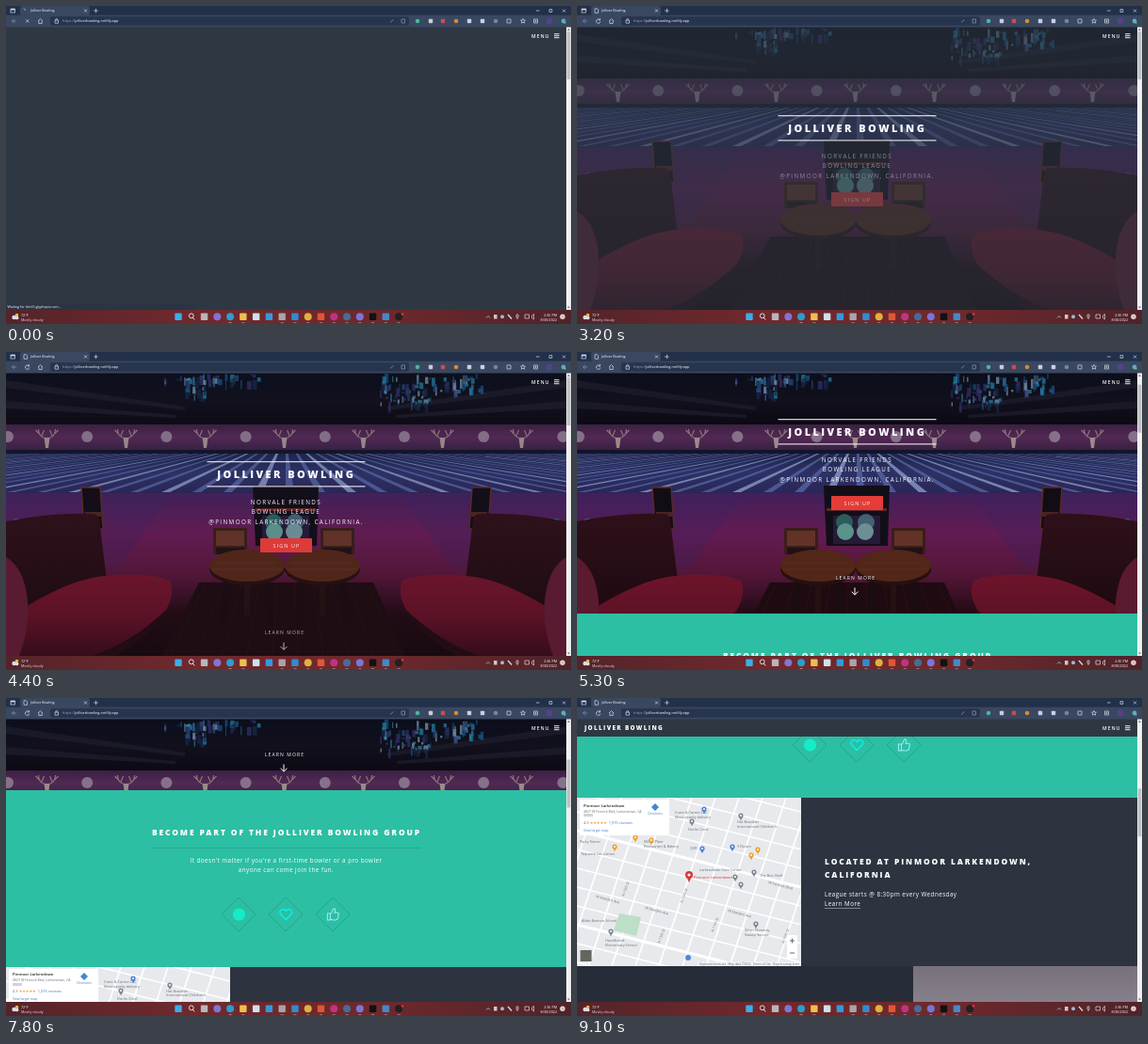
These frames come from a looping animation (600 px wide and 338 px high, 9.3 s). An HTML page:

```html
<!DOCTYPE html>
<html lang="en">
<head>
<meta charset="utf-8">
<title>Jolliver Bowling</title>
<style>
html, body { margin: 0; width: 100%; height: 100%; overflow: hidden; background: #2e3842; }
svg { display: block; width: 600px; height: 338px; }
text { font-family: "Open Sans", "Noto Sans", sans-serif; fill: #fff; white-space: pre; }
.caps { letter-spacing: .225em; }
.body { letter-spacing: .075em; }
.mid { text-anchor: middle; }
.semi { font-weight: 600; }
.heavy { font-weight: 800; }
.map text { fill: #6a7078; }
.line { fill: none; stroke: #d5dae4; stroke-width: .7; }
</style>
</head>
<body>
<svg id="stage" viewBox="0 0 600 338"></svg>
<script>
const LOOP = 9300, REVEAL = 600, BANNER_BOTTOM = 323;
const SLATE = '#2e3842';

// Markup helpers
const rect = (x, y, w, h, fill, more = '') =>
  `<rect x="${x}" y="${y}" width="${w}" height="${h}" fill="${fill}" ${more}/>`;
const disc = (x, y, rx, fill, ry = rx) => `<ellipse cx="${x}" cy="${y}" rx="${rx}" ry="${ry}" fill="${fill}"/>`;
const path = (d, fill, more = '') => `<path d="${d}" fill="${fill}" ${more}/>`;
const stroke = (d, color = '#d5dae4', width = .7) => path(d, 'none', `stroke="${color}" stroke-width="${width}"`);
const text = (x, y, size, str, cls = '', more = '') =>
  `<text x="${x}" y="${y}" font-size="${size}" class="${cls}" ${more}>${str}</text>`;
const group = (id, body, more = '') => `<g id="${id}" ${more}>${body}</g>`;
const repeat = (n, fn) => Array.from({ length: n }, (_, i) => fn(i)).join('');
const gradient = (id, stops, dir = 'x2="0" y2="1"') => `<linearGradient id="${id}" ${dir}>` +
  stops.map((c, i) => `<stop offset="${i / (stops.length - 1)}" stop-color="${c}"/>`).join('') + '</linearGradient>';

let seed = 7;
const random = () => (seed = seed * 16807 % 2147483647) / 2147483647;

const defs = '<defs><clipPath id="view">' + rect(0, 22, 595, 301, '#000') + '</clipPath>' +
  '<clipPath id="mapBox">' + rect(0, 0, 238, 179, '#000') + '</clipPath>' +
  gradient('ceiling', ['#0b0e1b', '#11101c', '#0c0913']) +
  gradient('wall', ['#3b2043', '#522953', '#381f42']) +
  gradient('lanes', ['#1d2144', '#2c3266', '#2b2455']) +
  gradient('floor', ['#42205a', '#631b52', '#531637', '#200a13', '#16080e']) +
  gradient('seat', ['#6e142b', '#5d1125', '#350c19']) +
  gradient('sofa', ['#2e1019', '#260d15', '#1b0910']) +
  gradient('bar', ['#54242a', '#70292d', '#6d292c', '#50232a'], '') +
  gradient('room', ['#77717c', '#9b949f', '#a58e98']) + '</defs>';

function photoSide() {
  const colors = ['#8a2633', '#226b74', '#323e83', '#4f6b33', '#843d67', '#283e4a'];
  return path('M0 152H175L120 230H0Z', '#3b2460', 'opacity=".3"') +
    rect(0, 188, 72, 9, '#15101c') +
    repeat(9, i => disc(3 + i * 8, 187 - i % 2 * 5, 5, colors[i % 6])) +
    path('M80 144H100L103 188H83Z', '#120d15', 'stroke="#5a2a24" stroke-width="1.5"') + rect(84, 170, 17, 5, '#4a2421') +
    path('M0 180Q50 170 92 172Q98 172 99 178L107 243Q80 275 0 285Z', 'url(#sofa)') +
    path('M14 275Q70 240 106 238Q152 234 174 243Q180 256 170 274Q150 304 116 323H0Q4 290 14 275Z', 'url(#seat)') +
    path('M170 274Q150 304 116 323H92Q135 308 170 274Z', '#210a13') +
    path('M0 218Q20 230 23 265Q25 295 14 323H0Z', '#5a1a30');
}

function photoTable(x) {
  return path(`M${x - 25} 238L${x - 29} 290H${x - 24}L${x - 18} 240H${x + 18}L${x + 24} 290H${x + 29}L${x + 25} 238Z`, '#1a0c11') +
    rect(x - 3, 238, 6, 42, '#241113') + disc(x, 231, 40, '#26100f', 17) + disc(x, 227, 40, '#522619', 17) +
    stroke(`M${x - 34} 224H${x + 30}M${x - 37} 231H${x + 36}`, '#67351f', .6);
}

function photo() {
  const specks = (x, y, w, h, n) => repeat(n, () =>
    rect(x + random() * w, y + random() * h, 1 + random() * 4, 2 + random() * 9,
      ['#1d4f80', '#2483a6', '#33336e', '#7d9cb0', '#162a4c'][random() * 5 | 0], 'opacity=".7"'));
  const antlers = x => stroke(`M${x} 92Q${x - 9} 91 ${x - 9} 82M${x - 6} 90L${x - 3} 83M${x - 8} 87L${x - 12} 83` +
    `M${x} 92Q${x + 9} 91 ${x + 9} 82M${x + 6} 90L${x + 3} 83M${x + 8} 87L${x + 12} 83`, '#8d7a80', 1.1) +
    path(`M${x - 3} 91H${x + 3}L${x + 1.5} 102H${x - 1.5}Z`, '#9c898b');
  const chair = x => rect(x, 187, 36, 28, '#3b1d19', 'rx="1"') + rect(x + 3, 190, 30, 16, '#633226') +
    rect(x + 3, 208, 30, 7, '#211113');
  const side = photoSide();
  return rect(0, 22, 595, 57, 'url(#ceiling)') +
    path('M0 30L190 58V62L0 38ZM595 30L405 58V62L595 38ZM0 52L180 67V70L0 60ZM595 52L415 67V70L595 60Z', '#191927') +
    specks(168, 22, 102, 9, 40) + specks(190, 28, 20, 18, 16) + specks(396, 23, 112, 18, 60) + specks(396, 40, 55, 16, 30) +
    rect(0, 77, 595, 28, 'url(#wall)') +
    repeat(8, i => disc(2 + i * 84.2, 90, 6, '#87718a')) + repeat(7, i => antlers(43.5 + i * 84)) +
    rect(0, 104, 595, 48, 'url(#lanes)') +
    repeat(81, i => {
      const k = i - 40, top = 297 + k * 10, bottom = 297 + k * 33;
      return path(`M${top} 107H${top + 2.5}L${bottom + 9} 149H${bottom}Z`, i % 3 ? '#5967a4' : '#91a0cc', 'opacity=".75"');
    }) +
    rect(0, 104, 595, 4, '#12152a') +
    rect(0, 150, 595, 173, 'url(#floor)') +
    path('M205 245H390L425 323H165Z', '#1d0b11') +
    repeat(10, i => stroke(`M${212 + i * 19} 246L${175 + i * 27} 323`, '#2c1117', .8)) +
    side + `<g transform="translate(595 0) scale(-1 1)">${side}</g>` +
    path('M262 142H332L330 206H265Z', '#120e18') + rect(265, 166, 64, 3, '#5d2728') + rect(272, 174, 50, 30, '#251b38') +
    [[284, 181, '#2d5c5b'], [307, 181, '#455f73'], [285, 191, '#5a938c'], [306, 191, '#6c8f96']].map(([x, y, c]) => disc(x, y, 9, c)).join('') +
    chair(220) + chair(334) + photoTable(256) + photoTable(336);
}

const signUp = () =>
  ['NORVALE FRIENDS', 'BOWLING LEAGUE', '@PINMOOR LARKENDOWN, CALIFORNIA.'].map((s, i) =>
    text(297.5, 161.8 + i * 10.4, 6.25, s, 'caps mid')).join('') +
  rect(270, 198, 55, 15, '#e43c37', 'rx=".8"') + text(298, 207.5, 5.3, 'SIGN UP', 'caps mid');

const headline = () => group('title',
  text(297.7, 134, 10.94, 'JOLLIVER BOWLING', 'caps heavy mid') +
  rect(213.5, 116.2, 168, 1, '#fff', 'id="lineTop"') + rect(213.5, 142.4, 168, 1, '#fff', 'id="lineBottom"'));

const more = () => group('more', text(296, 287, 5, 'LEARN MORE', 'caps mid') +
  stroke('M295 295.5V303M291.5 299.7L295 303.2L298.5 299.7', '#fff', 1));

function greenSection() {
  const diamond = x => path(`M${x} 114L${x + 18} 132L${x} 150L${x - 18} 132Z`, 'none', 'stroke="#239f88" stroke-width=".8"');
  return rect(0, 0, 595, 188.5, '#2cbfa3') +
    text(298, 48, 8.44, 'BECOME PART OF THE JOLLIVER BOWLING GROUP', 'caps heavy mid') +
    rect(155, 61, 285, .8, '#25a58d') +
    text(297.5, 77, 6.25, "It doesn't matter if you're a first-time bowler or a pro bowler", 'body mid') +
    text(297.5, 87.4, 6.25, 'anyone can come join the fun.', 'body mid') +
    [247, 297, 347].map(diamond).join('') + disc(247.5, 132, 6.6, '#14edc6') +
    stroke('M297.3 137.5L291.8 132C288.8 128 294.2 124.5 297.3 128.5C300.4 124.5 305.8 128 302.8 132Z', '#08f0ee', 1.4) +
    stroke('M341.4 131H344.4V138H341.4ZM344.5 131.5C347.5 129 346.5 126 348.3 125.8C350.5 126 349.8 128.5 349 130.3H352.4' +
      'C354.2 131 353 132.5 352.8 133C353.5 135 352 138 350 138H347L344.5 137', '#9aeaf7', 1.1);
}

function map() {
  const road = (x1, y1, x2, y2, w = 2.2) => stroke(`M${x1} ${y1}L${x2} ${y2}`, '#fff', w);
  const pin = (x, y, color, r = 2.6) => path(`M${x - r * .8} ${y + 1}L${x} ${y + r * 2}L${x + r * .8} ${y + 1}Z`, color) +
    disc(x, y, r, color) + disc(x, y, r * .4, '#fff');
  const places = [[104, 17, 'Crate &amp; Carrier LLC'], [104, 22, 'Most nearby delivery'], [118, 35, 'Dorlin Crest'],
    [170, 27, 'Hat Brandler'], [170, 31.5, "International Children's"], [170, 53, '9 Dozen'], [120, 55, 'QVR'],
    [194, 84, 'The Box Shelf'], [130, 78, 'Larkendown Care Center'], [71, 48, "Milo's Plate"],
    [71, 52.5, 'Restaurant &amp; Bakery'], [3, 48, 'Party Stores'], [4, 61, 'Taqueria Los Lomos'],
    [5, 132, 'Alder Avenue School'], [30, 153, 'Hazelbrook'], [30, 157.5, 'Elementary School'],
    [178, 142, 'Wren Chimney'], [178, 146.5, 'Sweep Service']];
  const streets = [[203, 91, 15, 'W Fennick Blvd'], [20, 106, 15, 'W Marden Ave'], [72, 118, 15, 'W Marden Ave'],
    [160, 121, 15, 'W Marden Ave'], [112, 112, -70, 'N 12th St'], [145, 143, -70, 'N 11th St'],
    [88, 155, -70, 'N 13th St'], [50, 105, -70, 'N 15th St'], [220, 155, -70, 'N 10th St']];
  return rect(0, 0, 238, 179, '#e7e9ed') +
    repeat(15, i => road(0, -65 + i * 20, 238, -5 + i * 20, i % 5 ? 1.6 : 3)) +
    repeat(13, i => road(-28 + i * 25, 0, -88 + i * 25, 179, 1.7)) +
    path('M45 123L68 127L63 147L39 141Z', '#bddfc5') +
    streets.map(([x, y, a, s]) => text(x, y, 3.8, s, '', `transform="rotate(${a} ${x} ${y})"`)).join('') +
    places.map(([x, y, s]) => text(x, y, 3.9, s)).join('') +
    [[40, 52], [62, 42], [79, 45], [185, 61], [192, 55]].map(([x, y]) => pin(x, y, '#efa02c')).join('') +
    [[133, 54], [135, 12], [165, 52]].map(([x, y]) => pin(x, y, '#4b80d9')).join('') +
    [[122, 25], [174, 92], [168, 84], [174, 19], [36, 142], [190, 134], [188, 79]].map(([x, y]) => pin(x, y, '#7b8794')).join('') +
    pin(119, 82, '#d63932', 4) + text(124, 85.5, 4.1, 'Pinmoor Larkendown', '', 'style="fill:#cb3a32"') +
    rect(3, 2, 95, 38, '#fff', 'rx="1"') +
    text(7, 9.5, 4.2, 'Pinmoor Larkendown', 'semi', 'style="fill:#222"') +
    text(7, 15.5, 3.5, '4827 W Fennick Blvd, Larkendown, CA') + text(7, 20, 3.5, '00000') +
    text(7, 27.5, 4, '4.3 <tspan fill="#ef9d2b">★★★★★</tspan>  <tspan fill="#4678c0">1,076 reviews</tspan>') +
    text(7, 35.5, 3.5, 'View larger map', '', 'style="fill:#4678c0"') +
    path('M83 6L87 10L83 14L79 10Z', '#4285d4') + text(83, 18, 3.3, 'Directions', 'mid', 'style="fill:#4678c0"') +
    rect(3.5, 162, 12, 12, '#62665f') + disc(118, 170, 3, '#5487db') +
    rect(223, 146, 11, 25, '#fff', 'rx="1"') + stroke('M226 152H231M228.5 149.5V154.5M226 165H231', '#666', 1) +
    rect(128, 174.5, 110, 4.5, '#f2f3f5') +
    text(236, 178, 3.1, 'Keyboard shortcuts   Map data ©2022   Terms of Use   Report a map error', '', 'text-anchor="end"');
}

const spotlights = () => rect(0, 188, 595, 179, '#2d3440') + rect(0, 367, 595, 179, '#272d38') +
  rect(357, 367, 238, 179, 'url(#room)') +
  group('map', map(), 'class="map" transform="translate(0 188)" clip-path="url(#mapBox)"') +
  text(263, 258.7, 8.44, 'LOCATED AT PINMOOR LARKENDOWN,', 'caps heavy') + text(263, 273.4, 8.44, 'CALIFORNIA', 'caps heavy') +
  text(263, 293.2, 6.25, 'League starts @ 8:30pm every Wednesday', 'body') +
  text(263, 303.3, 6.25, 'Learn More', 'body') + rect(263, 305, 38, .6, '#b8bcc2');

const menu = () => text(558, 33.8, 5, 'MENU', 'caps semi') + [29.3, 31.3, 33.3].map(y => rect(582, y, 5.5, .9, '#fff')).join('');

function browser() {
  const extensions = [[437, '#49b79b'], [451, '#c6ccd2'], [464, '#c84b53'], [478, '#d38b33'], [492, '#c7cfd8'],
    [506, '#c9cbea'], [520, '#77849a']];
  return rect(0, 0, 600, 10, '#22304a') + rect(15, 0, 74, 10, '#394760', 'rx="2"') + rect(0, 9.7, 600, 12.8, '#394760') +
    rect(47, 11.3, 381, 9.5, '#27344d', 'rx="2"') +
    rect(5, 3, 4.5, 4, 'none', 'class="line"') + rect(5, 3, 4.5, 1.4, '#d5dae4') +
    text(26, 6.4, 3.65, 'Jolliver Bowling') + stroke('M83 3.5L86 6.5M86 3.5L83 6.5M95.5 2.7V7.3M93.2 5H97.8') +
    stroke('M563 5H566.5M577 3.6H579.8V6.4H577ZM591 3.6L594 6.6M594 3.6L591 6.6') +
    stroke('M11 16H6.5L8.7 13.7M6.5 16L8.7 18.3', '#8e9ab0') +
    stroke('M34 16L36.5 13.6L39 16M34.8 15.4V18.5H38.2V15.4') +
    group('stop', stroke('M21 14.3L24.4 17.7M24.4 14.3L21 17.7')) +
    group('reload', stroke('M24.2 14.6A2.2 2.2 0 1 0 24.8 16.5M24.5 13V15H22.5')) +
    group('spinner', path('M18.5 2.8A2.2 2.2 0 0 1 20.7 5', 'none', 'stroke="#7cb4e8" stroke-width=".8"')) +
    group('favicon', stroke('M19 2.7H21.3L22.6 4V7.3H19Z')) +
    stroke('M52 15.2H55.5V18.2H52ZM52.7 15V14Q53.7 12.7 54.7 14V15') +
    text(60, 17.4, 3.9, '<tspan fill="#9ba6b9">https://</tspan>jolliverbowling.netlify.app') +
    stroke('M408 17.5L411.5 14.5M420 14H423.5V18H420Z', '#8e9ab0') +
    extensions.map(([x, c], i) => i % 3 ? rect(x - 2.2, 13.8, 4.4, 4.4, c, 'rx=".8"') : disc(x, 16, 2.3, c)).join('') +
    stroke('M532 14H536V18H532ZM549 13.5L549.8 15.2H551.5L550.2 16.4L550.7 18.2L549 17.2L547.3 18.2L547.8 16.4L546.5 15.2H548.2Z' +
      'M560.5 14H564.5V18H560.5ZM562.5 15V17M561.5 16H563.5') +
    disc(577, 16, 3.5, '#53428a') + disc(592, 16, 2.4, '#58adc0') + disc(593.4, 17.6, 1.2, '#62bd73');
}

function taskbar() {
  const apps = ['#39aeea', '', '#b7b6bc', '#8274d1', '#299fca', '#efbf4d', '#cbe2ec', '#2e9bde', '#a9a4a8', '#318bd0',
    '#dfb13d', '#e15635', '#c03285', '#456d95', '#7b75d7', '#101312', '#4589c4', '#222025'];
  const round = [3, 4, 10, 12, 13, 14, 17];
  const x = i => 183 + i * 13.77;
  return rect(0, 323, 600, 15, 'url(#bar)') +
    apps.map((c, i) => !c ? stroke('M198.3 331.2L200.2 333.4', '#eee', 1) + stroke('M194.4 329.3A2.4 2.4 0 1 0 199.2 329.3A2.4 2.4 0 1 0 194.4 329.3', '#eee', .9)
      : round.includes(i) ? disc(x(i), 330.2, 4, c) : rect(x(i) - 3.7, 326.6, 7.4, 7.4, c, 'rx=".8"')).join('') +
    disc(421, 327.5, 1.3, '#e33') + [4, 5, 8, 9, 10, 11, 12, 13, 14, 15, 16, 17].map(i => rect(x(i) - 1.5, 336, 3, .8, i === 4 ? '#e38a80' : '#a98486')).join('') +
    disc(11.5, 328.5, 1.8, '#efb943') + disc(8.5, 331, 2.2, '#dce0e5') + disc(11.5, 331.4, 1.9, '#dce0e5') +
    text(16, 329.5, 3.7, '72°F') + text(16, 335, 3.7, 'Mostly cloudy', '', 'opacity=".85"') +
    stroke('M510 331.5L512 329.5L514 331.5M551 328H555.5V332H551ZM542 328H544V331H542ZM543 331V333M558.5 329V331.5L560.5 333V327.5Z') +
    rect(518, 328, 3.5, 4.5, '#d0c7c7') + disc(527, 330.3, 2, '#9fb8cf') + stroke('M533 328L537 332.5', '#ddd', 1.3) +
    text(585, 329.5, 3.7, '2:36 PM', '', 'text-anchor="end"') + text(585, 335, 3.7, '8/30/2022', '', 'text-anchor="end"') +
    disc(591, 330.2, 2.7, '#e7d7d5') + text(591, 331.5, 3.5, '1', 'mid', 'style="fill:#5a262b"');
}

document.getElementById('stage').innerHTML = defs + rect(0, 0, 600, 338, SLATE) +
  group('viewport',
    photo() + group('lead', signUp()) + rect(0, 22, 595, 301, SLATE, 'id="veil"') +
    group('banner', headline() + more()) + group('page', greenSection() + spotlights()) +
    group('header', rect(0, 22, 595, 19, SLATE) + text(8, 33.8, 6.25, 'JOLLIVER BOWLING', 'caps heavy')) + menu() +
    group('status', rect(0, 316.5, 201, 6.5, '#2a3443') + text(1.5, 321.2, 3.6, 'Waiting for html5.glyphapis.com...')),
    'clip-path="url(#view)"') +
  rect(595, 22, 5, 301, '#f0f0f1') + rect(595.7, 27, 3.6, 51, '#bfc0c3', 'id="thumb"') +
  path('M596 26L597.5 24L599 26ZM596 319.5L597.5 321.5L599 319.5Z', '#777') + browser() + taskbar();

// Motion
const clamp = v => Math.min(1, Math.max(0, v));
const bezier = (x1, y1, x2, y2) => x => {
  const at = (a, b, u) => 3 * a * u * (1 - u) ** 2 + 3 * b * u * u * (1 - u) + u ** 3;
  let lo = 0, hi = 1;
  for (let i = 0; i < 20; i++) {
    const mid = (lo + hi) / 2;
    if (at(x1, x2, mid) < x) lo = mid; else hi = mid;
  }
  return at(y1, y2, (lo + hi) / 2);
};
const ease = bezier(.25, .1, .25, 1), easeInOut = bezier(.42, 0, .58, 1);
const progress = (t, start, duration, curve) => {
  const p = clamp((t - start) / duration);
  return p === 0 || p === 1 ? p : curve(p);
};

// Wheel scrolling: start, end, distance
const scrolls = [[4880, 5300, 45], [5400, 6200, 90], [6300, 6700, 45], [7400, 8400, 135], [8420, 9100, 90]];
const scrollAt = t => scrolls.reduce((sum, [a, b, d]) => sum + d * progress(t, a, b - a, easeInOut), 0);

const el = id => document.getElementById(id);
const set = (id, name, value) => el(id).setAttribute(name, value);
const show = (id, on) => set(id, 'visibility', on ? 'visible' : 'hidden');

function draw(t) {
  const loading = t < 500, scroll = scrollAt(t);
  ['stop', 'spinner', 'status'].forEach(id => show(id, loading));
  ['reload', 'favicon'].forEach(id => show(id, !loading));
  set('spinner', 'transform', `rotate(${t * .6} 18.5 5)`);

  const titleIn = progress(t, REVEAL, 500, ease), lineWidth = 168 * progress(t, REVEAL + 250, 850, ease);
  set('title', 'opacity', titleIn);
  set('title', 'transform', `translate(297.5 130) scale(${.95 + .05 * titleIn}) translate(-297.5 -130)`);
  set('lineTop', 'width', lineWidth);
  set('lineBottom', 'width', lineWidth);
  set('lineBottom', 'x', 381.5 - lineWidth);
  set('veil', 'opacity', 1 - progress(t, REVEAL + 1250, 3000, easeInOut));

  const moreIn = progress(t, REVEAL + 3500, 750, ease);
  set('more', 'opacity', moreIn);
  set('more', 'transform', `translate(0 ${42 * (1 - moreIn)})`);

  ['lead', 'banner'].forEach(id => set(id, 'transform', `translate(0 ${-scroll})`));
  set('page', 'transform', `translate(0 ${BANNER_BOTTOM - scroll})`);
  set('header', 'opacity', clamp((scroll - 282) / 20));
  set('thumb', 'y', 27 + scroll * .171);
}

function tick() {
  draw(performance.now() % LOOP);
  requestAnimationFrame(tick);
}
tick();
</script>
</body>
</html>
```
